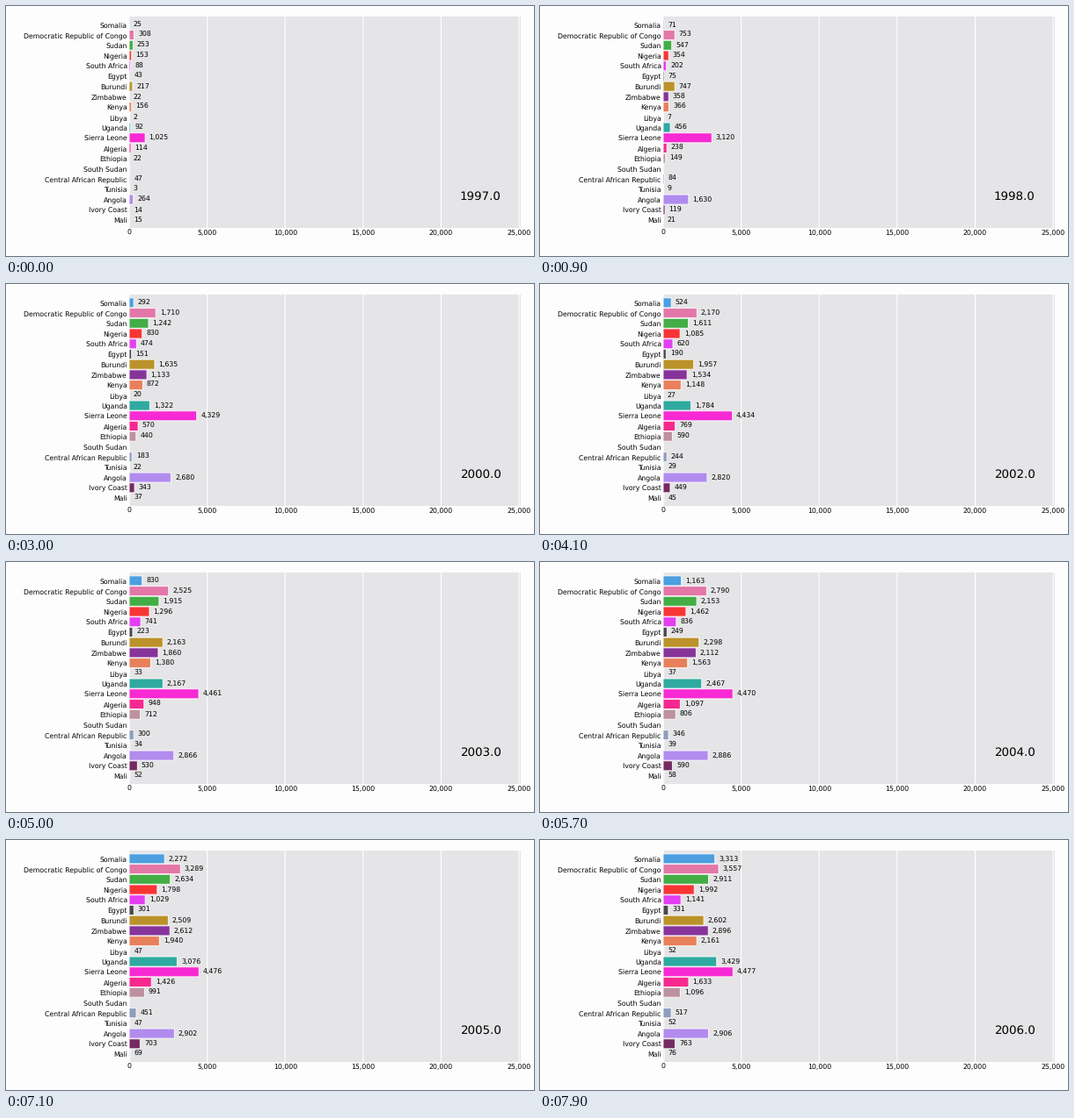
Recreate the animation shown at these times as a matplotlib script. Size 600 by 285 pixels, loop 8000 ms.

```python
import matplotlib.pyplot as plt
import numpy as np
from matplotlib.animation import FuncAnimation
from matplotlib.ticker import MultipleLocator, StrMethodFormatter

W, H, DPI = 600, 285, 80
FRAMES, INTERVAL = 80, 100
STEPS_PER_YEAR, FIRST_YEAR = 8, 1997
X_MAX = 25110

# Name, colour, and running total at the start, halfway and at the end
COUNTRIES = [
    ("Somalia", "#4c9fe0", 25, 480, 3290),
    ("Democratic Republic of Congo", "#e377a8", 308, 2110, 3558),
    ("Sudan", "#42ae45", 253, 1560, 2911),
    ("Nigeria", "#f73535", 153, 1050, 1992),
    ("South Africa", "#e33ff2", 88, 600, 1141),
    ("Egypt", "#4b474c", 43, 185, 331),
    ("Burundi", "#bb9229", 217, 1920, 2603),
    ("Zimbabwe", "#86349a", 22, 1480, 2896),
    ("Kenya", "#e8805b", 156, 1110, 2161),
    ("Libya", "#c8d8c8", 2, 26, 52),
    ("Uganda", "#2faaa0", 92, 1720, 3429),
    ("Sierra Leone", "#f72ad3", 1025, 4428, 4477),
    ("Algeria", "#f7288f", 114, 740, 1632),
    ("Ethiopia", "#bd91a0", 22, 570, 1096),
    ("South Sudan", "#cccccc", 0, 0, 0),
    ("Central African Republic", "#8f9dbd", 47, 235, 517),
    ("Tunisia", "#d8ccd8", 3, 28, 52),
    ("Angola", "#b18cee", 264, 2810, 2906),
    ("Ivory Coast", "#752b61", 14, 435, 763),
    ("Mali", "#d0d0d8", 15, 44, 76),
]


def totals(start, half, end):
    """Exponential growth through three totals, linear within each year."""
    if start == end:
        return np.full(FRAMES, float(start))
    share = (half - start) / (end - start)
    rate = 2 * np.log(share / (1 - share))
    years = np.arange(0, FRAMES + 1, STEPS_PER_YEAR)
    ease = np.expm1(-rate * years / (FRAMES - 1)) / np.expm1(-rate)
    return np.interp(np.arange(FRAMES), years, start + (end - start) * ease)


names, colors, *points = zip(*COUNTRIES)
values = np.array([totals(*p) for p in zip(*points)])
rows = np.arange(len(names), 0, -1)

plt.rcParams["text.hinting"] = "none"
fig = plt.figure(figsize=(W / DPI, H / DPI), dpi=DPI, facecolor="#fefdfe")
ax = fig.add_axes([140 / W, 1 - 253.4 / H, 445 / W, 241.4 / H], facecolor="#e5e4e6")
ax.set_xlim(0, X_MAX)
ax.set_ylim(0.2, len(names) + 0.8)
ax.set_axisbelow(True)
ax.grid(True, axis="x", color="white", linewidth=1, snap=False)
ax.spines[:].set_visible(False)
ax.tick_params(length=0, pad=2, labelsize=7)
ax.tick_params(axis="x", pad=1)
ax.xaxis.set_major_locator(MultipleLocator(5000))
ax.xaxis.set_major_formatter(StrMethodFormatter("{x:,.0f}"))
ax.set_yticks(rows, names)

bars = ax.barh(rows, values[:, 0], height=0.95, color=colors,
               edgecolor=(1, 1, 1, 0.8), linewidth=1, snap=False)
labels = [ax.text(0, y, "", size=7, ha="left", va="center") for y in rows]
year = ax.text(0.95, 0.15, "", size=12, ha="right", va="center", transform=ax.transAxes)


def update(step):
    for bar, label, v in zip(bars, labels, values[:, step]):
        bar.set_width(v)
        label.set_x(v + 0.01 * X_MAX)
        label.set_text(f"{v:,.0f}" if v > 0 else "")
    year.set_text(f"{FIRST_YEAR + step // STEPS_PER_YEAR:.1f}")
    return [*bars, *labels, year]


anim = FuncAnimation(fig, update, frames=FRAMES, interval=INTERVAL,
                     init_func=lambda: update(0), repeat=True, repeat_delay=0)
plt.show()
```
